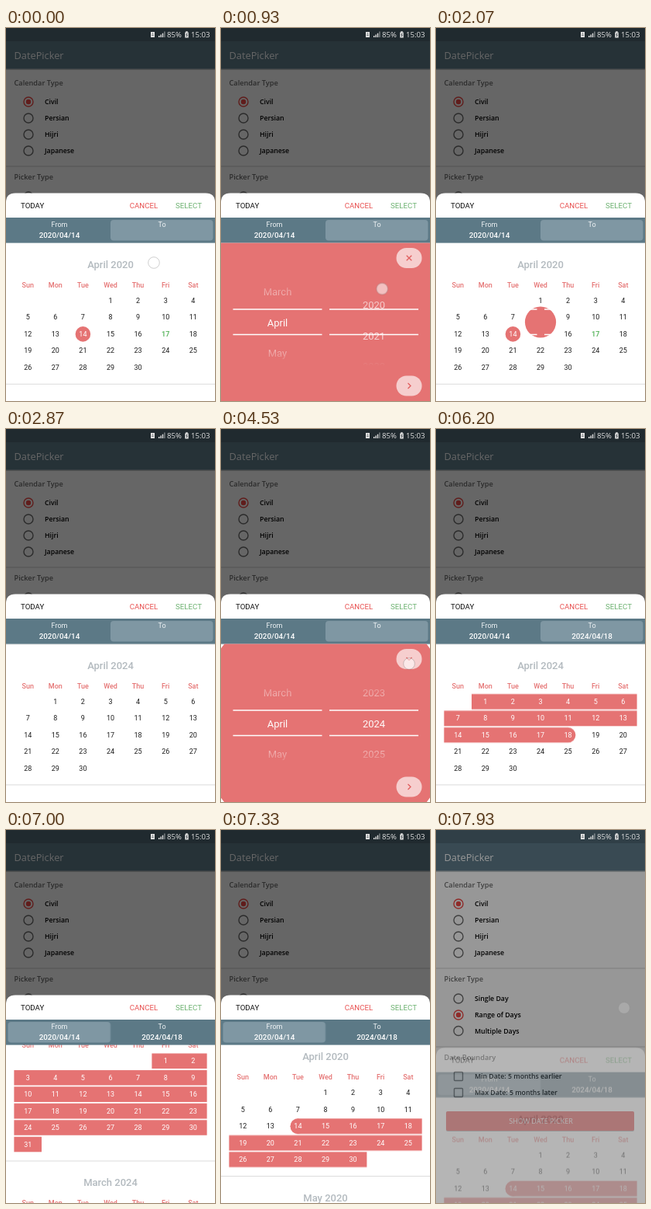
An HTML page that plays this animation: 270 px wide and 480 px high, repeating every 8000 ms.

```html
<!DOCTYPE html>
<html lang="en">
<head>
<meta charset="utf-8">
<title>Date picker</title>
<style>
html, body { margin: 0; width: 100%; height: 100%; overflow: hidden; background: #000; }
svg { display: block; width: 270px; height: 480px; }
text { font-family: Roboto, sans-serif; font-size: 9px; dominant-baseline: central; }
.page text, .bar text { font-family: "Open Sans", "Noto Sans", sans-serif; }
.mid { text-anchor: middle; }
.head { font-size: 9.2px; font-weight: 600; fill: #6a6a6a; }
.opt { font-size: 8.75px; font-weight: 600; fill: #000; }
.ring { fill: none; stroke: #6c6c6c; stroke-width: 1.4; }
.on circle { fill: #f04a46; }
.on .ring { fill: none; stroke: #f04a46; }
.act { font-size: 9.7px; }
.date { font-size: 9.9px; font-weight: 500; fill: #fff; }
.title { font-size: 13px; font-weight: 500; fill: #b3babf; }
.week { font-weight: 500; fill: #e57373; }
.day { fill: #1c1c1c; }
.today { fill: #66bb6a; font-weight: 700; }
.lit { fill: #fff; }
.wheel text { font-size: 13px; fill: #fff; text-anchor: middle; }
.icon { fill: none; stroke: #e05f5f; stroke-width: 1.3; }

.dim, .sheet, .touch, .scroll, .years, .hole, .fold, .span, .lit, .to, .pick {
  animation: 8s linear infinite;
}
.dim { animation-name: dim; }
.sheet { animation-name: leave; }
.touch { animation-name: touch; animation-timing-function: step-end; }
.scroll { animation-name: scroll; }
.years { animation-name: years; }
.hole { animation-name: reveal; animation-timing-function: cubic-bezier(.37, 0, .63, 1); }
.fold { animation-name: fold; }
.span { animation-name: grow; transform-box: fill-box; transform-origin: center; }
.lit { animation-name: show; }
.to { animation-name: to; animation-timing-function: step-end; }
.pick { animation-name: pick; animation-timing-function: step-end; }

@keyframes dim { 0%, 98.25% { opacity: .6; } 100% { opacity: .22; } }
@keyframes leave {
  0%, 97.56% { transform: none; opacity: 1; animation-timing-function: cubic-bezier(.333, 0, .667, .333); }
  99.44%, 100% { transform: translateY(96px); opacity: 0; }
}
@keyframes touch {
  0% { transform: translate(191px, 302px); opacity: 1; }
  1.6% { transform: translate(199px, 362px); opacity: 0; }
  9.95% { transform: translate(199px, 362px); opacity: 1; animation-timing-function: linear; }
  11.625% { transform: translate(208px, 336px); opacity: 1; animation-timing-function: linear; }
  14% { transform: translate(239px, 262px); opacity: 1; }
  14.4% { transform: translate(243px, 460px); opacity: 0; }
  20.85% { transform: translate(243px, 460px); opacity: 1; }
  22.4% { transform: translate(191px, 302px); opacity: 0; }
  38.35% { transform: translate(191px, 302px); opacity: 1; }
  42.5% { transform: translate(243px, 302px); opacity: 0; }
  54.95% { transform: translate(243px, 302px); opacity: 1; }
  56.9% { transform: translate(172px, 402px); opacity: 0; }
  71.6% { transform: translate(172px, 402px); opacity: 1; }
  73% { transform: translate(68px, 258px); opacity: 0; }
  84.1% { transform: translate(68px, 258px); opacity: 1; }
  85.1% { transform: translate(243px, 229px); opacity: 0; }
  95.85% { transform: translate(243px, 229px); opacity: 1; }
  98.5% { transform: translate(243px, 229px); opacity: 1; animation-timing-function: linear; }
  99.45%, 100% { transform: translate(243px, 229px); opacity: 0; }
}
@keyframes scroll {
  0%, 26.875% { transform: none; animation-timing-function: cubic-bezier(.333, 1, .667, 1); }
  36.25%, 85.15% { transform: translateY(-586.7px); animation-timing-function: cubic-bezier(.333, 1, .667, 1); }
  94.14%, 100% { transform: none; }
}
@keyframes years {
  0%, 10.75% { transform: none; }
  11.625% { transform: translateY(-22px); }
  14% { transform: translateY(-95px); animation-timing-function: cubic-bezier(.333, 1, .667, 1); }
  20%, 100% { transform: translateY(-158px); }
}
@keyframes reveal {
  0%, 1.875% { r: 0px; }
  6.875%, 22.5% { r: 169px; }
  26.875%, 42.75% { r: 0px; }
  47.75%, 56.25% { r: 169px; }
  60.625%, 100% { r: 0px; }
}
@keyframes fold {
  0%, 5.6%, 22.4%, 46.5%, 56.5%, 100% { d: path("M-3.5 -2L0 1.5M3.5 -2L0 1.5"); }
  7.4%, 21.25%, 48.25%, 55.1% { d: path("M-3.3 -3.3L3.3 3.3M3.3 -3.3L-3.3 3.3"); }
}
@keyframes grow {
  0%, 73.4% { transform: scaleY(0); animation-timing-function: ease-out; }
  77.3%, 100% { transform: none; }
}
@keyframes show { 0%, 73.4% { opacity: 0; } 76%, 100% { opacity: 1; } }
@keyframes to { 0% { opacity: 0; } 73.4%, 100% { opacity: 1; } }
@keyframes pick { 0% { transform: none; } 85.1%, 100% { transform: translateX(-132.5px); } }
</style>
</head>
<body>
<svg viewBox="0 0 270 480">
  <defs>
    <clipPath id="list"><rect y="276.5" width="270" height="204"/></clipPath>
    <clipPath id="hole"><circle class="hole" cx="135" cy="378.5" r="0"/></clipPath>
    <linearGradient id="fade" x2="0" y2="1">
      <stop offset="0" stop-color="#000"/>
      <stop offset=".16" stop-color="#666"/>
      <stop offset=".5" stop-color="#fff"/>
      <stop offset=".84" stop-color="#666"/>
      <stop offset="1" stop-color="#000"/>
    </linearGradient>
    <mask id="drum" maskUnits="userSpaceOnUse" x="0" y="323" width="270" height="112">
      <rect y="323" width="270" height="112" fill="url(#fade)"/>
    </mask>
  </defs>

  <g class="page">
    <rect width="270" height="480" fill="#fff"/>
    <rect y="52" width="270" height="2" fill="#c4c8ca"/>
    <rect width="270" height="17" fill="#506a77"/>
    <rect y="17" width="270" height="35.5" fill="#607d8b"/>
    <text x="10.5" y="34.7" fill="#fff" font-weight="500" style="font-size:12.8px">DatePicker</text>
    <path d="M0 178H270M0 279H270" stroke="#d0d0d0"/>
    <rect x="13" y="363" width="243" height="25" rx="2" fill="#bbb"/>
    <rect x="13" y="362" width="243" height="25" rx="2" fill="#e56666"/>
    <text class="mid" x="135.5" y="374.5" fill="#fff">SHOW DATE PICKER</text>
    <g id="options"></g>
  </g>
  <rect class="dim" width="270" height="480" opacity=".6"/>

  <g class="bar" fill="#e4e4e4">
    <path d="M187 5h5v7h-5zM197 10h1.4v2h-1.4zM199.4 8.5h1.4v3.5h-1.4zM201.8 6.7h1.4v5.3h-1.4zM231.3 5.5h1v-1.3h2.4v1.3h1v7h-4.4z"/>
    <path d="M204.2 4.5h1.4v7.5h-1.4z" opacity=".5"/>
    <path d="M188.3 9.2h2.4M188.8 7h1.4M234 6.5l-1 2.5h1.2l-1 2.2" stroke="#1c262b" stroke-width=".8" fill="none"/>
    <text x="208" y="8.3" style="font-size:9.6px">85%</text>
    <text x="239" y="8.3" style="font-size:9.6px">15:03</text>
  </g>

  <g class="sheet">
    <path d="M0 480V224.4Q0 212.4 12 212.4H258Q270 212.4 270 224.4V480Z" fill="#fff"/>
    <text class="act" x="19" y="228.5" fill="#111">TODAY</text>
    <text class="act" x="159.7" y="228.5" fill="#e85050">CANCEL</text>
    <text class="act" x="219" y="228.5" fill="#6ab06e">SELECT</text>
    <g clip-path="url(#list)"><g class="scroll" id="months"></g></g>
    <rect y="244" width="270" height="32.6" fill="#5c7986"/>
    <rect class="pick" x="135" y="247" width="132.5" height="26.5" rx="4" fill="#7f97a3"/>
    <text class="mid" x="69" y="253.2" fill="#f0f4f6">From</text>
    <text class="mid" x="201.5" y="253.2" fill="#f0f4f6">To</text>
    <text class="mid date" x="69" y="266">2020/04/14</text>
    <text class="mid date to" x="201.5" y="266">2024/04/18</text>

    <g clip-path="url(#hole)">
      <rect y="276.6" width="270" height="203.4" fill="#e57373"/>
      <g class="wheel" mask="url(#drum)">
        <g id="names"></g>
        <g class="years" id="years"></g>
      </g>
      <path d="M15.5 362H130.5M15.5 394.5H130.5M140 362H255M140 394.5H255" stroke="#fff" stroke-width="1.3"/>
      <g fill="#fff" fill-opacity=".65">
        <rect x="226.5" y="283" width="33" height="26" rx="13"/>
        <rect x="226.5" y="447.5" width="33" height="26" rx="13"/>
      </g>
      <g transform="translate(243 296)"><path class="icon fold" d="M-3.5 -2L0 1.5M3.5 -2L0 1.5"/></g>
      <path class="icon" d="M241.5 457l3.5 3.5l-3.5 3.5"/>
    </g>
  </g>

  <circle class="touch" r="7.3" fill="#fff" fill-opacity=".55" stroke="#777" stroke-opacity=".35"/>
</svg>
<script>
const put = (id, html) => document.getElementById(id).innerHTML += html;
const text = (x, y, cls, str) => `<text x="${x}" y="${y}" class="${cls}">${str}</text>`;

// Settings page behind the sheet
const heads = [[70, 'Calendar Type'], [191, 'Picker Type'], [292, 'Date Boundary']];
const radios = [[95, 'Civil', 1], [116, 'Persian'], [137, 'Hijri'], [158, 'Japanese'],
  [217, 'Single Day'], [238, 'Range of Days', 1], [258.5, 'Multiple Days']];
const checks = [[317, 'Min Date: 5 months earlier'], [338, 'Max Date: 5 months later']];
heads.forEach(([y, s]) => put('options', text(10.5, y, 'head', s)));
radios.forEach(([y, s, on]) => {
  const ring = `<circle class="ring" cx="29" cy="${y}" r="6"/>`;
  const dot = `<circle cx="29" cy="${y}" r="3.2"/>`;
  put('options', text(50, y, 'opt', s) + (on ? `<g class="on">${ring}${dot}</g>` : ring));
});
checks.forEach(([y, s]) => put('options',
  text(50, y, 'opt', s) + `<rect class="ring" x="23.5" y="${y - 5.5}" width="11" height="11" rx="1"/>`));

// Month and year wheels
const PITCH = 39.5;
['March', 'April', 'May'].forEach((s, i) => put('names', text(73, 379 + (i - 1) * PITCH, '', s)));
for (let i = -2; i < 7; i++) put('years', text(197.5, 379 + i * PITCH, '', 2020 + i));

// Calendar list
const CELL = 35.6, LEFT = 10.4, ROW = 21.45;
const colX = c => LEFT + CELL * (c + .5);

function span(y, c0, c1, roundL, roundR) {
  const h = 9.8;
  const a = roundL ? colX(c0) : LEFT + CELL * c0;
  const b = roundR ? colX(c1) : LEFT + CELL * (c1 + 1);
  const cap = (on, dy) => on ? `a${h} ${h} 0 0 1 0 ${dy}` : `v${dy}`;
  return `<path class="span" fill="#e57373" d="M${a} ${y - h}H${b}${cap(roundR, 2 * h)}H${a}${cap(roundL, -2 * h)}z"/>`;
}

function month(top, year, m, from, to) {
  const first = new Date(year, m, 1).getDay();
  const days = new Date(year, m + 1, 0).getDate();
  const rows = Math.ceil((first + days) / 7);
  const name = ['March', 'April', 'May'][m - 2];
  const start = year === 2020 && m === 3;
  const end = year === 2024 && m === 3;
  const last = Math.min(to, days);
  const rowY = r => top + 74 + ROW * r;
  let plain = text(135, top + 27.6, 'mid title', `${name} ${year}`), lit = '', bars = '';
  'Sun Mon Tue Wed Thu Fri Sat'.split(' ').forEach((d, c) => plain += text(colX(c), top + 54, 'mid week', d));
  for (let d = 1; d <= days; d++) {
    const c = (first + d - 1) % 7, y = rowY(Math.floor((first + d - 1) / 7));
    const chosen = start && d === 14;
    if (chosen) plain += `<circle cx="${colX(c)}" cy="${y}" r="9.8" fill="#e57373"/>`;
    plain += chosen ? `<text x="${colX(c)}" y="${y}" class="mid" fill="#fff">${d}</text>`
      : text(colX(c), y, 'mid ' + (start && d === 17 ? 'today' : 'day'), d);
    if (d >= from && d <= last) lit += text(colX(c), y, 'mid lit', d);
  }
  for (let r = 0; r < rows; r++) {
    const a = Math.max(from, r * 7 - first + 1), b = Math.min(last, r * 7 - first + 7);
    if (a <= b) bars += span(rowY(r), (first + a - 1) % 7, (first + b - 1) % 7, start && a === from, end && b === last);
  }
  const bottom = top + 74 + ROW * rows;
  put('months', plain + bars + lit + `<path d="M0 ${bottom}H270" stroke="#dcdcdc"/>`);
  return bottom;
}

let top0 = 277;
[[2020, 3, 14, 31], [2020, 4, 1, 31], [2024, 2, 1, 31], [2024, 3, 1, 18]]
  .forEach(args => top0 = month(top0, ...args));
</script>
</body>
</html>
```
